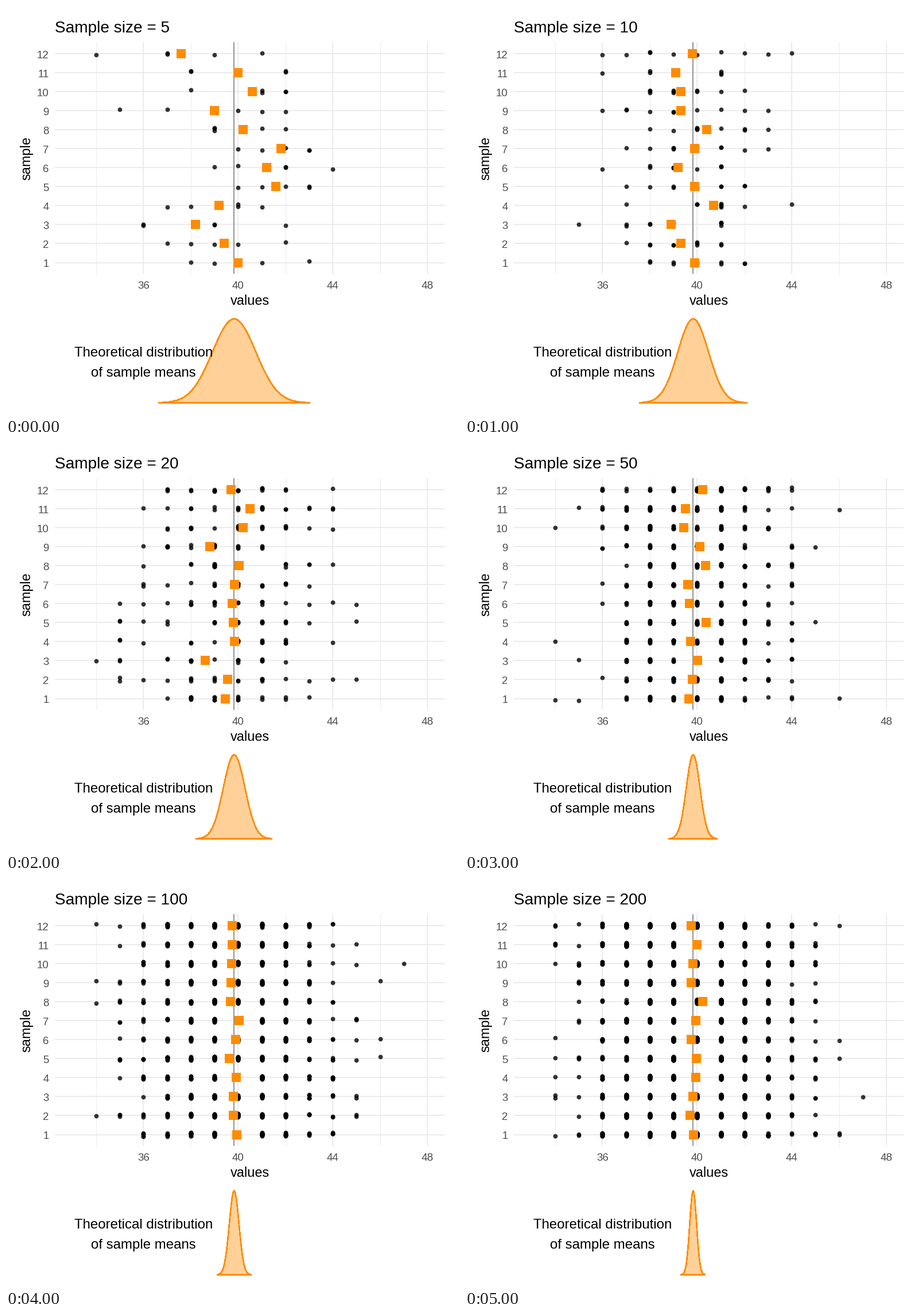
Animation, 789 px wide and 710 px high, one loop 6 s. Source, as a matplotlib script:

```python
import numpy as np
import matplotlib.pyplot as plt
from matplotlib.animation import FuncAnimation

W, H, DPI = 789, 710, 100
PT = 72 / DPI                      # points per pixel
MU, SD = 39.83, 2.05               # population
ORANGE, GRID, TICK = "#FF8C00", "#EBEBEB", "#4D4D4D"
LEFT, RIGHT, TOP, BOTTOM = 85, 764, 62, 465.5
PEAK, FLOOR = 544, 690
JITTER = 3.2

# Sample size: mean of each sample, from 1 to 12
MEANS = {
    5: [40, 39.4, 38.2, 39.2, 41.6, 41.2, 41.8, 40.2, 39, 40.6, 40, 37.6],
    10: [39.9, 39.3, 38.9, 40.7, 39.9, 39.2, 39.9, 40.4, 39.3, 39.3, 39.1, 39.8],
    20: [39.45, 39.55, 38.6, 39.85, 39.8, 39.75, 39.85, 40.05, 38.8, 40.2, 40.5, 39.7],
    50: [39.66, 39.8, 40.02, 39.72, 40.38, 39.68, 39.6, 40.36, 40.1, 39.44, 39.5, 40.24],
    100: [39.94, 39.8, 39.8, 39.92, 39.63, 39.89, 40.04, 39.68, 39.7, 39.72, 39.76, 39.74],
    200: [39.84, 39.69, 39.83, 39.94, 39.96, 39.76, 39.95, 40.23, 39.75, 39.83, 40, 39.74],
}
SIZES = list(MEANS)

plt.rcParams["font.family"] = "Liberation Sans"


def px(value):
    return 239 + 41.22 * (np.asarray(value) - 36)


def row_y(sample):
    return 446 - 33.08 * (np.asarray(sample) - 1)


def sample_dots(n):
    """Whole-number observations scattered around each sample mean."""
    rng = np.random.default_rng(n)
    z = rng.standard_normal((12, n))
    z -= z.mean(axis=1, keepdims=True)
    values = np.clip(np.round(np.c_[MEANS[n]] + SD * z), 34, 48)
    y = row_y(np.c_[1:13]) + rng.uniform(-JITTER, JITTER, (12, n))
    return np.column_stack([px(values).ravel(), y.ravel()])


def bell_outline(n):
    z = np.linspace(-3.48, 3.48, 121)
    x = px(MU + z * SD / np.sqrt(n))
    y = FLOOR - (FLOOR - PEAK) * np.exp(-z * z / 2)
    return np.column_stack([np.r_[x, x[-1], x[0]], np.r_[y, FLOOR, FLOOR]])


def label(x, y, text, size, color="black", **kw):
    return ax.text(x, y, text, fontsize=size * PT, color=color,
                   va="baseline", zorder=6, **kw)


def markers(size, **kw):
    return ax.scatter([], [], s=(size * PT) ** 2, lw=0, antialiased=False, **kw)


fig = plt.figure(figsize=(W / DPI, H / DPI), dpi=DPI, facecolor="white")
ax = fig.add_axes([0, 0, 1, 1])
ax.set(xlim=(-0.5, W - 0.5), ylim=(H - 0.5, -0.5))
ax.axis("off")

# Grid and tick labels
for v in range(34, 49, 2):
    major = v % 4 == 0
    ax.vlines(px(v), TOP, BOTTOM, color=GRID, lw=(2 if major else 1) * PT, zorder=1)
    if major:
        label(px(v), 492, str(v), 18.75, TICK, ha="center")
for s in range(1, 13):
    ax.hlines(row_y(s), LEFT - 0.5, RIGHT, color=GRID, lw=2 * PT, zorder=1)
    label(74.5, row_y(s) + 8, str(s), 18.75, TICK, ha="right")
ax.vlines(396.5, TOP, BOTTOM, color="#949494", lw=2 * PT, zorder=2)

# Fixed text
label(424, 520, "values", 23.5, ha="center")
label(42, 264.5, "sample", 23.5, ha="center", rotation=90, rotation_mode="anchor")
label(239, 610, "Theoretical distribution", 24, ha="center")
label(239, 644.5, "of sample means", 24, ha="center")

# Changing parts
title = label(85, 46, "", 28)
points = markers(7.8, c="black", alpha=0.8, zorder=3)
squares = markers(16, c=ORANGE, marker="s", zorder=4)
curve, = ax.fill([0, 1, 1], [0, 0, 1], fc=(1, 0.549, 0, 0.4), ec=ORANGE,
                 lw=1.6 * PT, zorder=3, antialiased=False)


def draw(i):
    n = SIZES[i]
    title.set_text(f"Sample size = {n}")
    points.set_offsets(sample_dots(n))
    squares.set_offsets(np.column_stack([px(MEANS[n]), row_y(np.arange(1, 13))]))
    curve.set_xy(bell_outline(n))
    return title, points, squares, curve


anim = FuncAnimation(fig, draw, frames=len(SIZES), interval=1000,
                     repeat=True, repeat_delay=0, blit=False)
plt.show()
```
